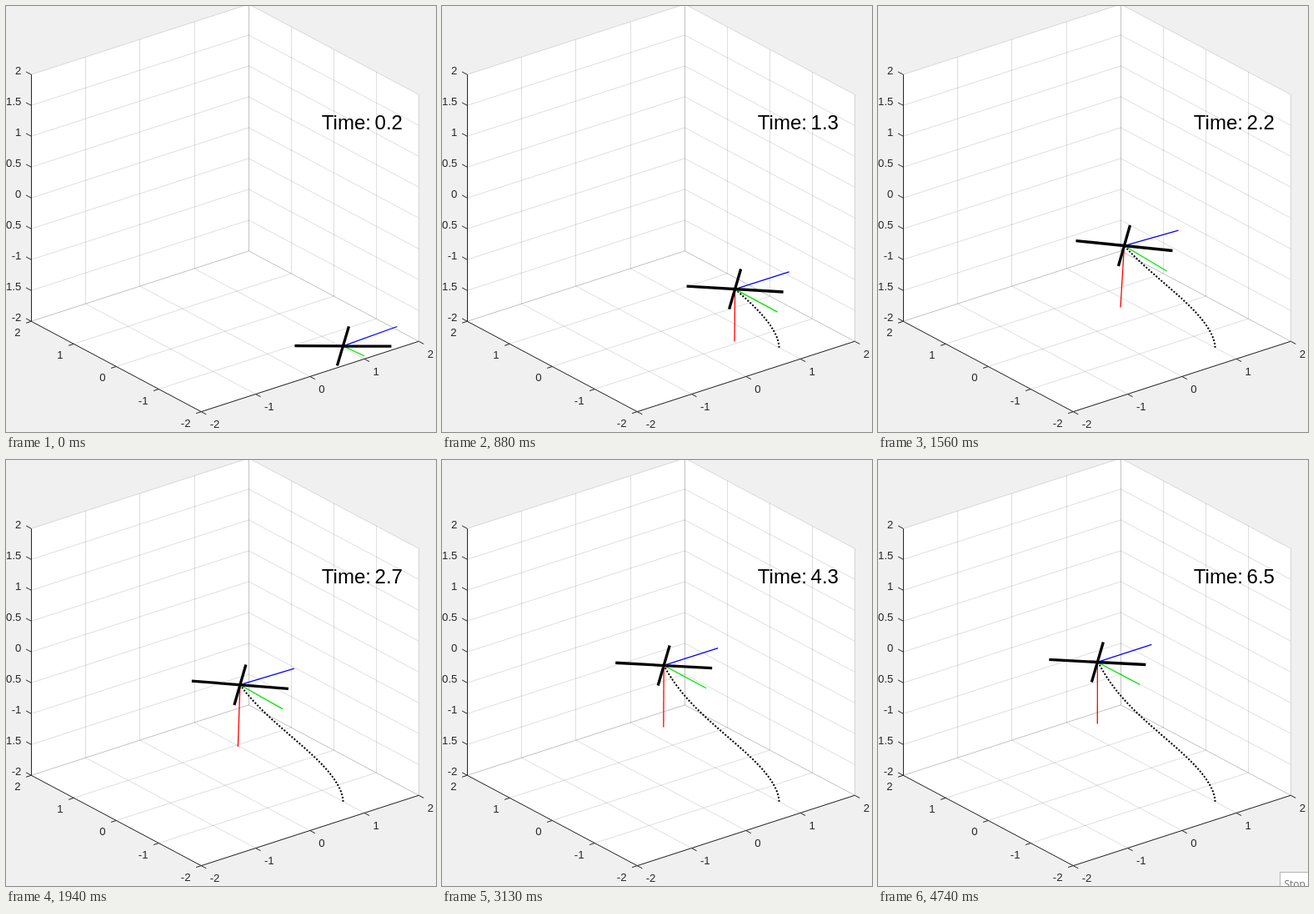
These frames come from a looping animation (516 px wide and 511 px high, 4780 ms). An HTML page:

```html
<!DOCTYPE html>
<html lang="en">
<head>
<meta charset="utf-8">
<title>Drone flight</title>
<style>
  html, body { margin: 0; width: 100%; height: 100%; overflow: hidden; background: #f0f0f0; }
  svg { display: block; width: 516px; height: 511px; }
  text { font-family: "Liberation Sans", Arial, sans-serif; font-size: 13.2px; fill: #262626; }
  path { fill: none; }
  .wall { fill: #fff; }
  .grid { stroke: #262626; stroke-opacity: .15; }
  .axis { stroke: #262626; }
  .trail { stroke: #000; stroke-width: 2; stroke-dasharray: 2 2; }
  .arms { stroke: #000; stroke-width: 3.3; }
  .dir { stroke-width: 1.3; }
  #time { font-size: 24px; word-spacing: -2px; fill: #000; }
  #tip text { font: 12px "Open Sans", sans-serif; fill: #6a6a6a; }
</style>
</head>
<body>
<svg id="stage" viewBox="0 0 516 511"></svg>
<script>
const LOOP = 4780;
const STEP = 74.8;
const LIM = 2;
const stage = document.getElementById('stage');

function add(tag, attrs, parent = stage) {
  const el = document.createElementNS('http://www.w3.org/2000/svg', tag);
  for (const name in attrs) el.setAttribute(name, attrs[name]);
  return parent.appendChild(el);
}

function label(x, y, str, anchor) {
  add('text', { x, y, 'text-anchor': anchor }).textContent = str;
}

// Screen vectors of the x and y axes; z points straight up
const X = [65.25, -21.1], Y = [-51, -27.1], Z = 74;
const project = (x, y, z) => [
  262.8 + X[0] * x + Y[0] * y,
  242.25 + X[1] * x + Y[1] * y - Z * z
];
const poly = pts => 'M' + pts.join('L');
const offset = ([x, y], dx, dy) => [x + dx, y + dy];

const left = project(-LIM, LIM, -LIM), near = project(-LIM, -LIM, -LIM), right = project(LIM, -LIM, -LIM);
const rise = -2 * LIM * Z;
add('path', {
  class: 'wall',
  d: poly([left, near, right, offset(right, 0, rise), project(LIM, LIM, LIM), offset(left, 0, rise)]) + 'Z'
});

const gridLine = (...pts) => add('path', { class: 'grid', d: poly(pts) });
function upright([x, y]) {
  const px = Math.floor(x) + .5;
  gridLine([px, y], [px, y + rise]);
}
for (let v = -LIM; v <= LIM; v++) {
  gridLine(project(v, -LIM, -LIM), project(v, LIM, -LIM));
  gridLine(project(-LIM, v, -LIM), project(LIM, v, -LIM));
  upright(project(v, LIM, -LIM));
  upright(project(LIM, v, -LIM));
}
for (let z = -LIM; z <= LIM; z += .5) {
  gridLine(project(-LIM, LIM, z), project(LIM, LIM, z));
  gridLine(project(LIM, LIM, z), project(LIM, -LIM, z));
}

let axes = poly([left, near, right]) + poly([[30.5, left[1]], [30.5, left[1] + rise]]);
const tick = (p, dx, dy) => poly([p, offset(p, dx, dy)]);
for (let v = -LIM; v <= LIM; v++) {
  const px = project(v, -LIM, -LIM), py = project(-LIM, v, -LIM);
  axes += tick(px, 6, 3.2) + tick(py, -6.2, 2);
  label(px[0] + 10.4, px[1] + 19.5, v, 'start');
  label(py[0] - 12.8, py[1] + 18, v, 'end');
}
for (let z = -LIM; z <= LIM; z += .5) {
  const p = project(-LIM, LIM, z);
  axes += tick(p, -6.2, -3.3);
  label(p[0] - 11.9, p[1] - .3, z, 'end');
}
add('path', { d: axes, class: 'axis' });

// Moving parts
const trail = add('path', { class: 'trail' });
const red = add('path', { class: 'dir', stroke: '#f00' });
const green = add('path', { class: 'dir', stroke: '#00e400' });
const blue = add('path', { class: 'dir', stroke: '#00f' });
const arms = add('path', { class: 'arms' });
const time = add('text', { id: 'time', x: 378.8, y: 148 });
const tip = add('g', { id: 'tip' });
add('rect', { x: 482.5, y: 494.5, width: 50, height: 30, fill: '#fff', stroke: '#b4b4b4' }, tip);
add('text', { x: 487.5, y: 513 }, tip).textContent = 'Stop';

// Share of the way still to go, sideways and upwards, after t steps
const TAU = 17.75;
const side = t => 1 / (1 + (t / TAU) ** 2.474 * Math.exp(t / 26.6));
const climb = t => Math.exp(-((t / TAU) ** 1.51));

// The drone settles from (1, -1.5, -2) to the centre of the box
const position = t => [side(t), -1.5 * side(t), -2 * climb(t)];

// It leans with its sideways acceleration
const lean = t => 750 * (side(t - 1) - 2 * side(t) + side(t + 1));

function draw(ms) {
  const step = Math.max(0, Math.floor((ms - 15) / STEP));
  const t = step + 1;
  const pos = position(t), tilt = lean(t);
  const at = project(...pos);
  const [bx, by, gx, gy] = [65, tilt - 21, 51, 27 + 1.4 * tilt];

  const arrow = (dx, dy, room = 1) => {
    const size = Math.min(1, room);
    return poly([at, offset(at, dx * size, dy * size)]);
  };
  const bar = (dx, dy) => poly([offset(at, -dx, -dy), offset(at, dx, dy)]);

  const pts = [];
  for (let s = 0; s <= t; s += .5) pts.push(project(...position(s)));
  trail.setAttribute('d', poly(pts));

  // Arrows are cut off where they leave the box
  blue.setAttribute('d', arrow(bx, by));
  green.setAttribute('d', arrow(gx, gy, pos[1] + LIM));
  red.setAttribute('d', arrow(-1.8 * tilt, Z, pos[2] + LIM));
  arms.setAttribute('d', bar((bx + gx) / 2, (by + gy) / 2) + bar((bx - gx) / 2, (by - gy) / 2));

  time.textContent = 'Time: ' + ((step + 2) / 10).toFixed(1);
  tip.setAttribute('opacity', Math.min(1, Math.max(0, (ms - 4340) / 160)));
}

const start = performance.now();
function frame() {
  draw((performance.now() - start) % LOOP);
  requestAnimationFrame(frame);
}
frame();
</script>
</body>
</html>
```
